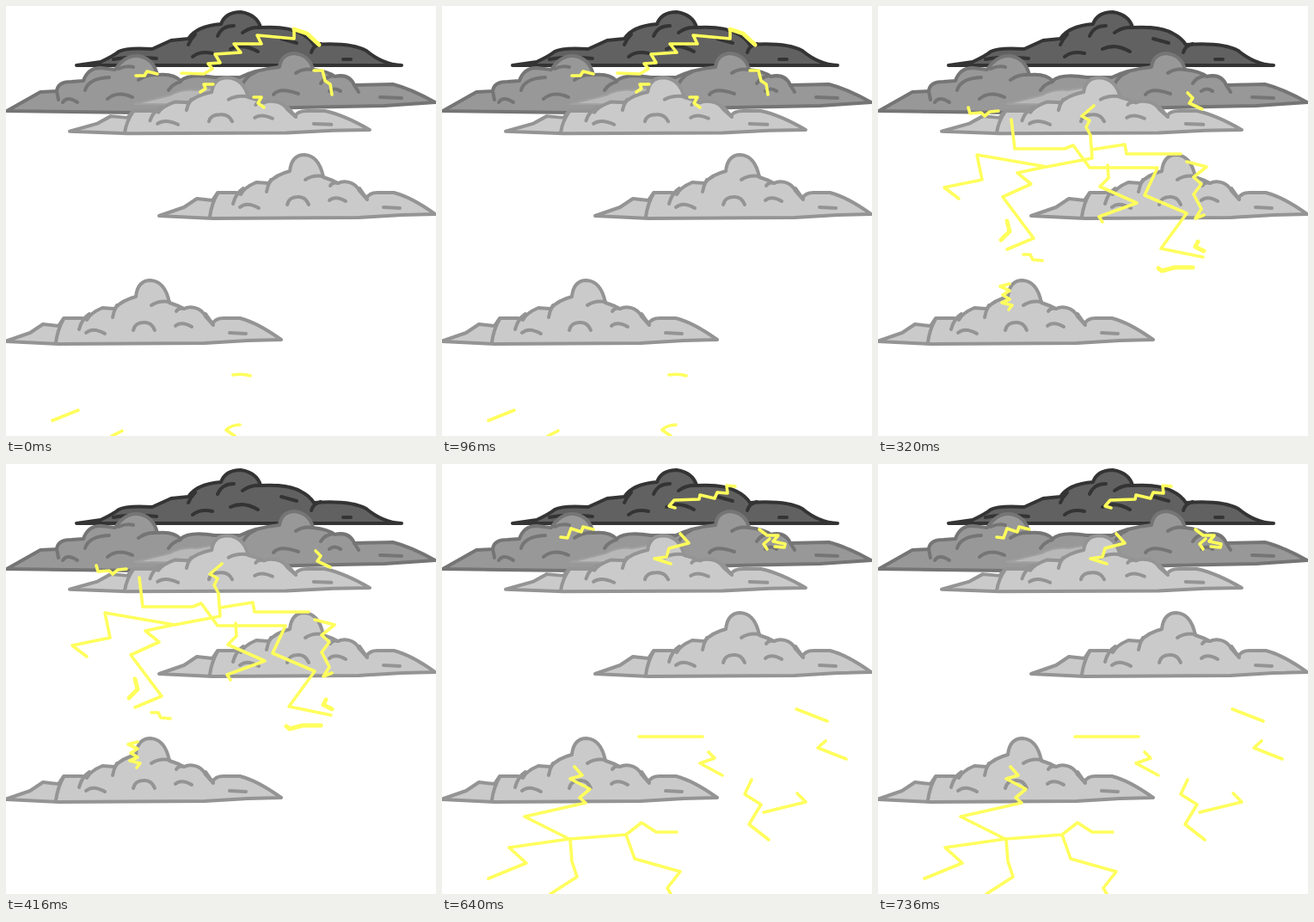
Write an HTML page that moves like this. It is 500 px wide and 500 px high and loops after 0.8 s.

```html
<!DOCTYPE html>
<html lang="en">
<head>
<meta charset="utf-8">
<title>Thunder clouds</title>
<style>
  html, body { margin: 0; height: 100%; overflow: hidden; background: #fff; }
  svg { display: block; width: 100vw; height: 100vh; }
  path { fill: none; stroke-width: 4; stroke-linecap: round; stroke-linejoin: round; vector-effect: non-scaling-stroke; }
  .body { fill: inherit; }
  .dark { stroke: #343434; fill: #616161; }
  .mid { stroke: #757575; fill: #989898; }
  .light { stroke: #949494; fill: #cacaca; }
  .bolt { stroke: #ffff5c; visibility: hidden; }
  .bolt path { stroke-width: 3.6; }
  .bolt .thick { stroke-width: 5; }
</style>
</head>
<body>
<svg viewBox="0 0 500 500">
  <defs>
    <g id="cloud">
      <path class="body" d="M178 244L207 234L222 224L240 226L246 217L268 217L273 219Q277 211 291 205L305 206Q314 196 330 192Q332 173 347 173Q364 174 369 199L380 203L386 206C392 203 405 203 411 215L419 224Q422 217 432 217L451 217Q471 222 499 242L460 243L410 246L240 247Z"/>
      <path d="M237 245Q239 230 246 218M264 230Q267 218 276 212M272 234Q280 227 294 235M303 216Q304 209 308 202M327 231Q329 222 339 222Q348 221 352 231M348 202Q357 196 369 198M376 226Q383 220 395 227M377 209Q380 204 386 206M411 212L420 225M439 234L458 235"/>
    </g>
  </defs>

  <g class="dark">
    <path class="body" d="M82 69L110 65Q125 58 131 53Q140 48 170 50L192 40L212 38Q222 23 250 21Q255 7 273 7Q292 10 296 25Q328 23 343 32Q353 37 358 45Q400 42 419 52Q438 68 460 69Z"/>
    <path d="M212 45Q215 38 220 33M246 35Q251 23 265 23M275 31Q284 24 296 25M217 59Q226 52 240 55M261 50Q276 43 293 53M125 62Q145 58 175 61M320 38L338 43M355 54Q357 46 366 44M392 62L401 62"/>
  </g>
  <g class="mid">
    <path class="body" d="M1 122L40 100L59 99Q60 88 76 88L90 87Q95 72 110 72L127 74Q138 57 153 58Q171 60 176 80Q195 78 203 87Q213 78 243 83L272 83Q290 74 318 71Q320 56 335 55Q353 57 357 74Q375 76 382 82Q399 78 405 92L450 91Q470 96 499 112L440 116L340 118L150 124Z"/>
    <path d="M59 99L61 109M66 112Q71 104 83 112M92 98Q96 84 120 83M118 108Q130 98 147 106M131 73Q140 69 148 71M154 86Q163 79 176 80M189 98Q193 91 203 88M273 95Q278 82 290 77M311 103Q318 94 340 102M337 78Q346 72 357 74M366 90Q370 83 380 81M376 99Q382 94 389 99M405 92L410 100M435 106L460 107"/>
  </g>
  <path d="M150 114L190 104Q207 96 221 98L245 94L250 115Z" style="fill:#b8b8b8;stroke:#a0a0a0;stroke-width:2"/>
  <g class="light">
    <use href="#cloud" transform="matrix(1.087 0 0 .88 -119.5 -69)"/>
    <use href="#cloud"/>
    <use href="#cloud" x="-179" y="146"/>
  </g>

  <g class="bolt">
    <path class="thick" d="M364 45L350 32L335 27"/>
    <path d="M335 27V38L292 34L297 44H265L273 54L243 56L249 66L235 67L240 73L230 79L204 78M241 91H230L232 96L226 100"/>
    <path d="M151 81H161L164 76L176 79M358 75H368L371 87L377 91L379 103M288 106H297L293 113L300 118"/>
    <path d="M264 429Q275 427 284 430M54 482L84 470M123 500L135 494M272 487Q262 487 256 493L266 500"/>
  </g>
  <g class="bolt">
    <path d="M271 50L267 54L243 56L249 62L240 65L252 70M172 76H143L131 87L114 85L122 94L104 98L111 106L99 112L98 120L112 125"/>
    <path d="M275 77L290 79L280 83L286 105L274 101L267 108L257 104L260 116L249 118L255 128L237 130L251 138L247 152L261 154"/>
    <path d="M369 76L389 84L387 91L411 88L422 118L408 116L397 121L388 118L379 124L369 116M343 172L358 168L360 175L353 181L365 184L362 190H367L338 195"/>
  </g>
  <g class="bolt">
    <path d="M155 132L159 166H217L227 162L246 188H325L310 220L359 241L329 282L378 292"/>
    <path d="M251 116L237 128L246 133L242 141L247 150L249 177L196 187L115 173L121 202L77 211L94 224M195 187L162 194L178 207L145 222L181 270L150 283"/>
    <path d="M249 167L287 161L289 172H352M359 181L382 187L367 199L376 207L367 219L376 236L369 247L379 243M267 185L268 200L258 210L301 229L257 245L261 251"/>
    <path class="thick" d="M150 250L153 262L143 272M372 274L369 280L379 285M326 305L330 308L345 304H366"/>
    <path d="M169 289H177L180 295L191 296M105 118L107 125L120 124L124 128L130 123L140 122M360 101L366 107L362 113L377 120"/>
    <path d="M153 323L142 326L153 331L145 336L153 341L144 345L156 348L152 353"/>
  </g>
  <g class="bolt">
    <path d="M304 40L320 37L314 30L325 32L327 21L340 27M118 183L121 202L82 212L96 220M165 245Q180 257 183 271L143 284M260 253L278 272"/>
    <path d="M324 244L332 248L345 246L355 250L372 246L378 233M345 248L356 258L328 282L382 293L399 280L443 292M330 278L285 288L303 318L315 340L293 348L314 356M208 315L242 319L303 319"/>
    <path d="M358 290L349 340L367 348L353 388L373 397L352 419L371 433L383 451M357 314L418 315L449 321L439 332L466 342M367 348Q405 370 422 392Q410 402 382 404"/>
    <path d="M171 317L153 313L158 321L144 325L158 331L138 340L144 347L160 350V361L150 360L161 368"/>
  </g>
  <g class="bolt">
    <path d="M341 26L331 25L332 34L320 33L317 40L300 36L299 41L270 42L264 49L271 51M138 85L146 86L150 75L162 79L164 73L176 76"/>
    <path d="M277 81L287 92L264 98L261 108L247 110L266 116M369 76L378 83H391L385 90L399 93L398 97L387 96M381 87L374 93L378 99"/>
    <path d="M229 317H303M310 335L317 342L300 348L326 362M412 285L448 299M446 322L437 330L470 343M360 367L352 384L371 396L357 419L380 437M413 383L423 393L374 405"/>
    <path d="M154 352L163 362L149 366L172 378L160 388L167 394L96 410L148 436L78 446L98 464L54 482M149 436L151 462L157 480L126 500"/>
    <path d="M148 436L214 431L224 459L277 474L262 493L266 500M214 431L232 417L249 428H273"/>
  </g>
</svg>
<script>
  const STEP = 160;
  const bolts = [...document.querySelectorAll('.bolt')];
  const start = performance.now();

  function draw() {
    const active = Math.floor((performance.now() - start) / STEP) % bolts.length;
    bolts.forEach((bolt, i) => { bolt.style.visibility = i === active ? 'visible' : 'hidden'; });
    requestAnimationFrame(draw);
  }
  draw();
</script>
</body>
</html>
```
